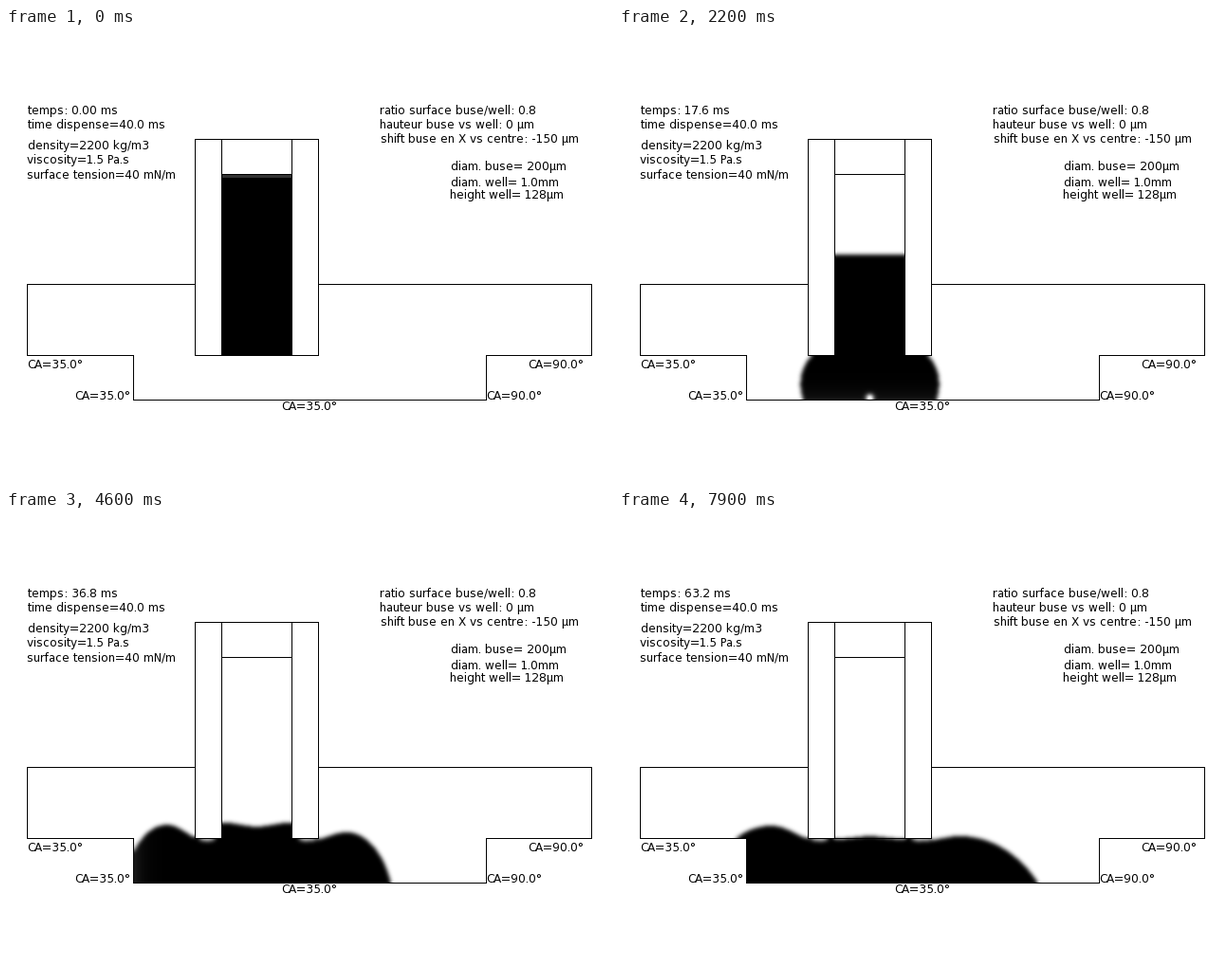
A matplotlib script that plays this animation: 640 by 480 pixels, repeating every 8000 ms.

```python
import numpy as np
import matplotlib.pyplot as plt
from matplotlib.animation import FuncAnimation
from matplotlib.path import Path

plt.rcParams.update({"font.family": "DejaVu Sans", "text.hinting_factor": 1})
W, H, DPI = 640, 480, 80
FRAMES, INTERVAL = 80, 100
PX = 72 / DPI          # points per pixel
CX = 264.5             # nozzle axis
FLOOR = 393.5
X0, X1, Y0, Y1 = 100, 470, 110, 400   # area that can hold liquid

yy, xx = np.mgrid[Y0:Y1, X0:X1] + 0.5
grid = np.column_stack([xx.ravel(), yy.ravel()])


def box(x0, x1, y0, y1):
    return (xx > x0) & (xx < x1) & (yy > y0) & (yy < y1)


channel = box(227, 302, 117, 346)
walls = box(199, 330, 117, 346) & ~channel
room = ((box(22, 618, 270, 346) | box(134, 507, 345, 393)) & ~walls) | channel
room = room.astype(float)


def blur(a, sigma=2.2, radius=6):
    k = np.exp(-np.arange(-radius, radius + 1) ** 2 / (2 * sigma ** 2))
    k /= k.sum()
    for axis in (0, 1):
        a = sum(w * np.roll(a, s - radius, axis) for s, w in enumerate(k))
    return a


room_blur = np.maximum(blur(room), 1e-6)


def ease(x0, y0, x1, y1, n=10):
    """Cosine ramp from one point to another."""
    u = np.linspace(0, 1, n, endpoint=False)
    return np.column_stack([x0 + (x1 - x0) * u,
                            y0 + (y1 - y0) * (1 - np.cos(np.pi * u)) / 2])


def lobe(f, side, crown_x, peak, rest):
    """Surface beside the nozzle: a dip under its wall, then an elliptical arc
    whose end angle relaxes as the drop spreads over the floor."""
    cx = np.interp(f, [13, 22, 46, 79], [28, 54, 95, crown_x])
    cy = np.interp(f, [37, 46, 54, 79], [344.5, peak + 2, peak, rest])
    angle = np.radians(50 + 130 * np.exp(-max(f - 13, 0) / 16))
    contact = 178 - 0.0333 * (79 - f) ** 2
    if f < 22:
        a = np.interp(f, [0, 13], [9, 18.5])
    else:
        a = (contact - cx) / np.sin(angle)
    bottom = 345 + (FLOOR - 345) * min(1, (f / 16) ** 0.6)

    t = np.linspace(0, angle, 40)
    arc = np.column_stack([cx + a * np.sin(t),
                           cy + (bottom - cy) * (1 - np.cos(t)) / (1 - np.cos(angle))])
    dip_x = min(52, (38 + cx) / 2)
    dip_y = np.interp(f, [22, 37], [346, 348.5])
    curve = np.vstack([ease(38, 345.5, dip_x, dip_y), ease(dip_x, dip_y, cx, cy), arc])
    return curve * [side, 1] + [CX, 0]


def meniscus(f):
    level = min(154.5 + 3.83 * f, 344.7)
    amp = np.interp(f, [30, 46, 79], [0, 2.1, -1.5])
    dx = np.linspace(-38, 38, 25)
    return np.column_stack([CX + dx, level + amp * np.cos(np.pi * dx / 37)])


def liquid(f):
    if f == 0:
        return channel * np.where(yy < 155, 0, np.where(yy < 158, 0.8, 1))
    right = lobe(f, 1, crown_x=95, peak=337, rest=343)
    left = lobe(f, -1, crown_x=104, peak=329, rest=332)
    outline = np.vstack([meniscus(f), right, left[::-1]])
    inside = Path(outline).contains_points(grid).reshape(xx.shape) * room
    v = blur(inside) / room_blur * room

    # air caught under the drop, then thin films on the floor and left wall
    air = np.interp(f, [14, 16, 22, 27], [0, 0.7, 1, 0])
    rx = np.interp(f, [15, 22], [20, 4.5])
    v *= 1 - air * np.exp(-((xx - CX) / rx) ** 2 - ((yy - 390.5) / 4.5) ** 2)
    film = np.interp(f, [13, 20, 46], [0, 0.09, 0])
    v *= 1 - film * np.exp((yy - 392) / 9)
    film = np.interp(f, [39, 45, 60], [0, 0.13, 0])
    v *= 1 - film * np.exp(-np.maximum(xx - 134, 0) / 9)
    return v


fig = plt.figure(figsize=(W / DPI, H / DPI), dpi=DPI, facecolor="white")
ax = fig.add_axes([0, 0, 1, 1])
image = ax.imshow(np.ones(xx.shape), cmap="gray", vmin=0, vmax=1, aspect="auto",
                  extent=(X0, X1, Y1, Y0), interpolation="nearest", zorder=1)
ax.set_xlim(0, W)
ax.set_ylim(H, 0)
ax.axis("off")


def line(*pts):
    x, y = np.array(pts).T
    ax.plot(x, y, color="black", lw=PX, antialiased=False, zorder=2,
            solid_capstyle="projecting", solid_joinstyle="miter")


def label(x, y, s):
    return ax.text(x, y, s, fontsize=12 * PX, color="black", va="baseline", zorder=3)


line((199, 270), (22, 270), (22, 345), (134, 345), (134, 392),
     (506, 392), (506, 345), (617, 345), (617, 270), (329, 270))
line((199, 117), (329, 117), (329, 345), (199, 345), (199, 117))
for x in (227, 301):
    line((x, 117), (x, 345))
line((227, 154), (301, 154))

clock = label(23, 91, "")
label(23, 106, "time dispense=40.0 ms")
label(23, 128, "density=2200 kg/m3")
label(22, 143, "viscosity=1.5 Pa.s")
label(22, 159, "surface tension=40 mN/m")
label(394, 91, "ratio surface buse/well: 0.8")
label(394, 106, "hauteur buse vs well: 0 µm")
label(395, 121, "shift buse en X vs centre: -150 µm")
label(469, 150, "diam. buse= 200µm")
label(469, 167, "diam. well= 1.0mm")
label(468, 180, "height well= 128µm")
for x, y in [(22, 359), (72, 392), (290, 403)]:
    label(x, y, "CA=35.0°")
for x, y in [(506, 392), (550, 359)]:
    label(x, y, "CA=90.0°")


def update(f):
    image.set_data(1 - liquid(f))
    ms = 0.8 * f
    clock.set_text(f"temps: {ms:.{2 if ms < 10 else 1}f} ms")
    return image, clock


anim = FuncAnimation(fig, update, frames=FRAMES, interval=INTERVAL,
                     repeat=True, repeat_delay=0, blit=False)
plt.show()
```
